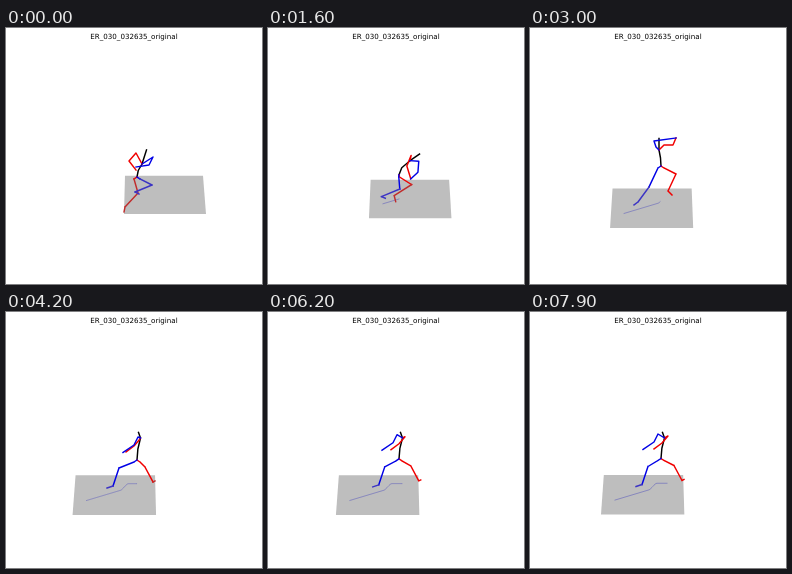
Recreate the animation shown at these times as an HTML page. Size 256 by 256 pixels, loop 8 s.

```html
<!DOCTYPE html>
<html lang="en">
<head>
<meta charset="utf-8">
<title>Walking skeleton</title>
<style>
  html, body { margin: 0; width: 100%; height: 100%; overflow: hidden; background: #fff; }
  svg { display: block; width: 100vw; height: 100vh; }
  path { fill: none; stroke-width: 1.45; stroke-linejoin: round; stroke-linecap: square; }
  text { font: 7.12px "DejaVu Sans", sans-serif; text-anchor: middle; text-rendering: geometricPrecision; }
</style>
</head>
<body>
<svg viewBox="0 0 256 256">
  <text x="128" y="10.6">ER_030_032635_original</text>
  <polygon id="floor" fill="#bebebe"/>
  <path id="trail" stroke="#7474bc" style="stroke-width:.75"/>
  <path id="spine" stroke="#000"/>
  <path id="rightLeg" stroke="#f00000"/>
  <path id="rightLegVeiled" stroke="#c02c2c"/>
  <path id="leftLeg" stroke="#0000e6"/>
  <path id="leftLegVeiled" stroke="#3c34c4"/>
  <path id="rightArm" stroke="#f00000"/>
  <path id="leftArm" stroke="#0000e6"/>
</svg>
<script>
const LOOP = 8000, STEP = 100, ROOT_X = 131, SETTLE = 4200;
const lerp = (a, b, k) => a + (b - a) * k;
const span = (t, from, to) => Math.min(1, Math.max(0, (t - from) / (to - from)));
const smooth = k => k * k * (3 - 2 * k);
const mix = (p, q, k) => p.map((v, i) => lerp(v, q[i], k));
const line = points => "M" + points.join("L");
const setPath = (id, d) => document.getElementById(id).setAttribute("d", d);
const joints = s => s.split(" ").map(p => p.split(",").map(Number));

// head: neck, crown; arms: shoulder, elbow, hand; legs: knee, ankle, toe
const pose = (t, hipY, head, rightArm, leftArm, rightLeg, leftLeg) => ({
  t, pelvis: [[ROOT_X, hipY]], head: joints(head),
  rightArm: joints(rightArm), leftArm: joints(leftArm),
  rightLeg: joints(rightLeg), leftLeg: joints(leftLeg)
});

const poses = [
  pose(0, 149, "136,136 140.5,122",
    "130,125 123,133 130,142", "147,129 143,137 130,139",
    "132,165 119,179 118,184", "146,157 129,164 133,166"),
  pose(900, 150, "142,137 151,129",
    "141,129 134,139 140,149", "154,136 151,147 140,150",
    "142,162 124,174 125,179", "142,161 122,166 127,167"),
  pose(2200, 144, "142,129 152,123.5",
    "145,126 143,137 145,152", "148,131 149,142 145,152",
    "145,152 128,162 130,169", "123,161 106,171 109,173"),
  pose(3000, 138, "129,122 129,110.5",
    "134,117 143,117 146,110", "126,119 124,113 146,110",
    "146,146 138,163 142,167", "119,159 108,174 104,177"),
  pose(SETTLE, 148, "134.5,126 132.5,120.5",
    "134,127 128,134 120,140", "132,125 128,133 117,140.5",
    "139,155 147,170 149,169", "113,156 107,174 101,176")
];

function bodyAt(t) {
  const n = Math.max(1, poses.findIndex(p => p.t > t)), last = poses.length - 1;
  const b = poses[t >= SETTLE ? last : n], a = poses[t >= SETTLE ? last - 1 : n - 1];
  const k = span(t, a.t, b.t);
  const part = name => a[name].map((p, i) => mix(p, b[name][i], k));
  const shift = (points, dx, dy) => points.map(([x, y]) => [x + dx, y + dy]);

  // In the final lunge the body only sinks slowly into place.
  const s = Math.sin(Math.PI / 2 * span(t, SETTLE, 7900));
  const [pelvis] = shift(part("pelvis"), 0, -1.5 * s);
  const [neck, crown] = part("head");
  const waist = [lerp(pelvis[0], neck[0], .25), lerp(pelvis[1], neck[1], .5)];
  const yaw = lerp(-1, 1, span(t, 900, 2200));
  const leg = (name, side) => [pelvis, [pelvis[0] + 3 * side * yaw, pelvis[1] + 2],
    ...shift(part(name), 5 * s, -1.5 * s)];
  const arm = (name, side) => [neck, ...shift(part(name), 4 * side * s, -3 * s)];
  return {
    spine: [pelvis, waist, neck, crown],
    rightArm: arm("rightArm", 1), leftArm: arm("leftArm", -1),
    rightLeg: leg("rightLeg", 1), leftLeg: leg("leftLeg", -1)
  };
}

// The floor slides back under the walker, then drifts forward again.
function floorAt(t) {
  const w = span(t, 0, 4500);
  const walk = (w + (1 - Math.cos(Math.PI * w)) / 2) / 2;
  const left = lerp(118, 64.5, walk) + 6.5 * smooth(span(t, 4800, 7500));
  const near = span(left, 118, 66), drop = smooth(near);
  return {
    left, right: left + lerp(82, 83.5, near),
    upLeft: left + lerp(1, 3, near), upRight: left + lerp(79, 82.5, near),
    top: lerp(147.8, 163.3, drop), bottom: lerp(186, 203, drop)
  };
}

// Path walked so far, measured from the lower left floor corner.
function trail(t, { left, bottom }) {
  const reach = ROOT_X - floorAt(Math.min(t, 4500)).left;
  const points = [];
  for (let x = 14; x <= reach; x++) {
    const rise = 14.5 + .3 * Math.min(x - 14, 36) + 6 * smooth(span(x, 48, 56));
    points.push([left + x, bottom - rise]);
  }
  return line(points);
}

// Bones lying low enough are seen through the translucent floor.
function drawLeg(id, leg, veilY) {
  let clear = "", veiled = "";
  for (let i = 1; i < leg.length; i++) {
    const bone = [leg[i - 1], leg[i]];
    if ((bone[0][1] + bone[1][1]) / 2 > veilY) veiled += line(bone);
    else clear += line(bone);
  }
  setPath(id, clear);
  setPath(id + "Veiled", veiled);
}

function draw(t) {
  const f = floorAt(t), body = bodyAt(t);
  document.getElementById("floor").setAttribute("points",
    [f.upLeft, f.top, f.upRight, f.top, f.right, f.bottom, f.left, f.bottom].join(" "));
  setPath("trail", trail(t, f));
  for (const id of ["spine", "rightArm", "leftArm"]) setPath(id, line(body[id]));
  for (const id of ["rightLeg", "leftLeg"]) drawLeg(id, body[id], lerp(f.top, f.bottom, .14));
}

const start = performance.now();
function tick() {
  const t = Math.max(0, performance.now() - start) % LOOP;
  draw(Math.floor(t / STEP) * STEP);
  requestAnimationFrame(tick);
}
tick();
</script>
</body>
</html>
```
